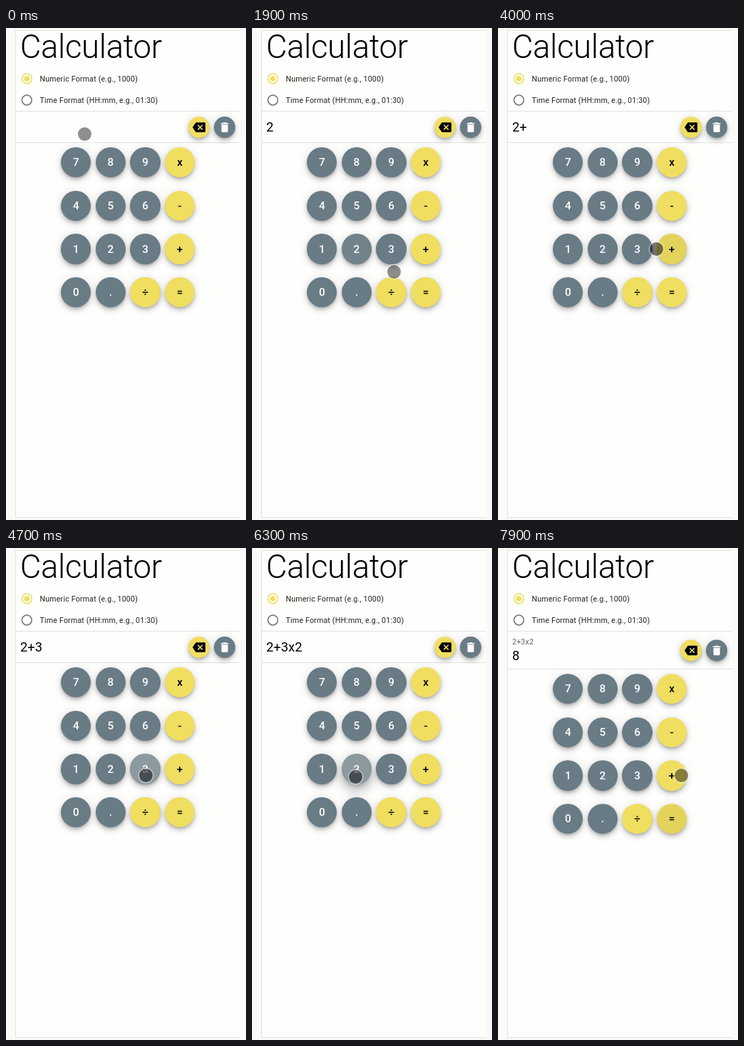
Recreate the animation shown at these times as an HTML page. Size 337 by 689 pixels, loop 8000 ms.

```html
<!DOCTYPE html>
<html lang="en">
<head>
<meta charset="utf-8">
<title>Calculator</title>
<style>
html, body { margin: 0; width: 100%; height: 100%; overflow: hidden; background: #fafaf9; }
#stage { position: relative; width: 337px; height: 689px; overflow: hidden; --u: .758px; font-family: Roboto, sans-serif; }
svg { position: absolute; left: 0; top: 0; }
.btn {
  position: absolute; display: flex; align-items: center; justify-content: center;
  border-radius: 50%; overflow: hidden; font-weight: 500; font-size: 15.2px; line-height: 1;
  background: #697b84; color: #fff;
  box-shadow: 0 calc(3*var(--u)) calc(5*var(--u)) calc(-1*var(--u)) rgba(0,0,0,.2),
    0 calc(6*var(--u)) calc(10*var(--u)) rgba(0,0,0,.14),
    0 var(--u) calc(18*var(--u)) rgba(0,0,0,.12);
}
.btn.accent { background: #f0de60; color: #000; }
.btn.down {
  box-shadow: 0 calc(7*var(--u)) calc(8*var(--u)) calc(-4*var(--u)) rgba(0,0,0,.2),
    0 calc(12*var(--u)) calc(17*var(--u)) calc(2*var(--u)) rgba(0,0,0,.14),
    0 calc(5*var(--u)) calc(22*var(--u)) calc(4*var(--u)) rgba(0,0,0,.12);
}
.btn svg { position: static; }
.btn span { position: relative; top: .8px; }
.btn i { position: absolute; border-radius: 50%; background: #fff; opacity: 0; }
.btn.accent i { background: #000; }
.btn .focus { inset: 0; }
#cursor {
  position: absolute; width: 19px; height: 19px; margin: -9.5px; border-radius: 50%;
  box-shadow: 0 0 0 1.4px rgba(255,255,255,.45);
}
</style>
</head>
<body>
<div id="stage">
  <svg width="337" height="689" viewBox="0 0 337 689">
    <rect x="13" y="3" width="316" height="683" fill="#fefefd"/>
    <path d="M329 3.5H13.5V685.5H329M13 116.5H329" fill="none" stroke="#e2e2e1"/>
    <path id="rule" d="M13 160.5H329" stroke="#e2e2e1"/>
    <text x="19.8" y="42" font-size="45.5" font-weight="300" letter-spacing="-.33">Calculator</text>
    <g fill="none" stroke-width="1.5">
      <circle cx="29.3" cy="71" r="6.9" stroke="#f0de60"/>
      <circle cx="29.3" cy="71" r="3.8" fill="#f0de60"/>
      <circle cx="29.3" cy="101" r="6.9" stroke="#757575"/>
    </g>
    <g font-size="10.6" letter-spacing=".2" fill="#212121">
      <text x="47.5" y="75">Numeric Format (e.g., 1000)</text>
      <text x="47.5" y="105">Time Format (HH:mm, e.g., 01:30)</text>
      <text id="history" x="20" y="135" fill="#666"></text>
    </g>
    <text id="entry" x="20" y="145" font-size="18.2" letter-spacing=".1"></text>
  </svg>
  <div id="keys"></div>
  <div id="cursor"></div>
</div>
<script>
const $ = id => document.getElementById(id);
const LOOP = 8000, STEP = 100;
const BACKSPACE = 'M22 3H7c-.69 0-1.23.35-1.59.88L0 12l5.41 8.11c.36.53.9.89 1.59.89h15c1.1 0 2-.9 2-2V5c0-1.1-.9-2-2-2zm-3 12.59L17.59 17 14 13.41 10.41 17 9 15.59 12.59 12 9 8.41 10.41 7 14 10.59 17.59 7 19 8.41 15.41 12 19 15.59z';
const TRASH = 'M6 19c0 1.1.9 2 2 2h8c1.1 0 2-.9 2-2V7H6v12zM19 4h-3.5l-1-1h-5l-1 1H5v2h14V4z';
const icon = (d, fill) => `<svg width="18.2" height="18.2" viewBox="0 0 24 24"><path d="${d}" fill="${fill}"/></svg>`;

const clamp = (v, lo = 0, hi = 1) => Math.max(lo, Math.min(hi, v));
const ease = k => k * k * (3 - 2 * k);
const mix = (a, b, k) => a + (b - a) * k;

// Where the pointer comes to rest, and the key it taps there, if any
const stops = [];
const rest = (t, x, y) => stops.push({ t, x, y });
const tap = (t, x, y, key, press) => stops.push({ t, x, y, key, press });
rest(0, 110.5, 148.5);
tap(500, 145, 316, '2', 1000);
rest(1300, 304, 133);
rest(1400, 240, 185);
rest(1900, 199.5, 341);
rest(2100, 239, 325);
rest(2600, 248, 319);
rest(3100, 205, 310);
tap(3400, 243, 312, '+', 3500);
rest(4000, 222.5, 309);
rest(4200, 200, 343);
tap(4400, 196, 318, '3', 4500);
rest(4900, 274, 230);
tap(5200, 249.5, 187, 'x', 5200);
tap(6000, 145.5, 320.5, '2', 6200);
tap(6500, 252.5, 376, '=', 6800);
rest(7900, 257.5, 318.5);
const taps = stops.filter(s => s.key);

// Longer ways take longer; each move ends as its stop is reached
function pointer(t) {
  const i = stops.findIndex(s => s.t > t);
  if (i < 0) return stops[stops.length - 1];
  const a = stops[i - 1], b = stops[i];
  const travel = Math.min(b.t - a.t, Math.max(200, 1.2 * Math.hypot(b.x - a.x, b.y - a.y)));
  const k = ease(clamp(1 - (b.t - t) / travel));
  return { x: mix(a.x, b.x, k), y: mix(a.y, b.y, k) };
}

const buttons = [];
function addButton(label, x, y, r, accent, shift, html) {
  const el = document.createElement('div');
  el.className = 'btn' + (accent ? ' accent' : '');
  el.style.cssText = `left:${x - r}px;top:${y - r}px;width:${2 * r}px;height:${2 * r}px`;
  el.innerHTML = `${html || `<span>${label}</span>`}<i class="focus"></i><i class="ripple"></i>`;
  $('keys').append(el);
  buttons.push({ label, x, y, r, shift, el, focus: el.querySelector('.focus'), ripple: el.querySelector('.ripple') });
}
[...'789x456-123+0.÷='].forEach((c, i) =>
  addButton(c, 98.3 + i % 4 * 48.6, 187.9 + (i >> 2) * 60.8, 21.2, 'x-+÷='.includes(c), 9.2));
addButton('back', 270.7, 138.8, 15.2, true, 4.4, icon(BACKSPACE, '#000'));
addButton('clear', 307.2, 138.8, 15.2, false, 4.4, icon(TRASH, '#fff'));

function drawButton(b, last, age, done) {
  const dy = done ? b.shift : 0;
  const active = last && last.key === b.label;
  b.el.style.transform = `translateY(${dy}px)`;
  b.el.classList.toggle('down', !!active && age <= 100);
  b.focus.style.opacity = active ? .05 : 0;
  b.ripple.style.opacity = 0;
  if (!active) return;
  const size = mix(8, 46, clamp((age + 80) / 200));
  const cx = clamp(last.x - b.x, -b.r, b.r) + b.r;
  const cy = clamp(last.y - b.y - dy, -b.r, b.r) + b.r;
  b.ripple.style.cssText = `left:${cx - size}px;top:${cy - size}px;width:${2 * size}px;height:${2 * size}px;` +
    `opacity:${.19 * (1 - clamp((age - 200) / 200))}`;
}

function draw(ms) {
  const t = Math.floor(ms % LOOP / STEP) * STEP;
  const pos = pointer(t);
  const last = taps.filter(s => s.press <= t).pop();
  const age = last ? t - last.press : Infinity;
  const typed = taps.filter(s => s.press + 100 <= t).map(s => s.key).join('');
  const done = typed.endsWith('=');

  $('history').textContent = done ? typed.slice(0, -1) : '';
  $('entry').textContent = done ? '8' : typed;
  $('entry').setAttribute('y', done ? 157 : 145);
  $('rule').setAttribute('transform', `translate(0 ${done ? 9 : 0})`);
  buttons.forEach(b => drawButton(b, last, age, done));

  Object.assign($('cursor').style, {
    left: pos.x + 'px', top: pos.y + 'px',
    background: `rgba(0,0,0,${age <= 500 ? .5 : .44})`
  });
}

let start;
function tick(now) {
  start ??= now;
  draw(now - start);
  requestAnimationFrame(tick);
}
draw(0);
requestAnimationFrame(tick);
</script>
</body>
</html>
```
